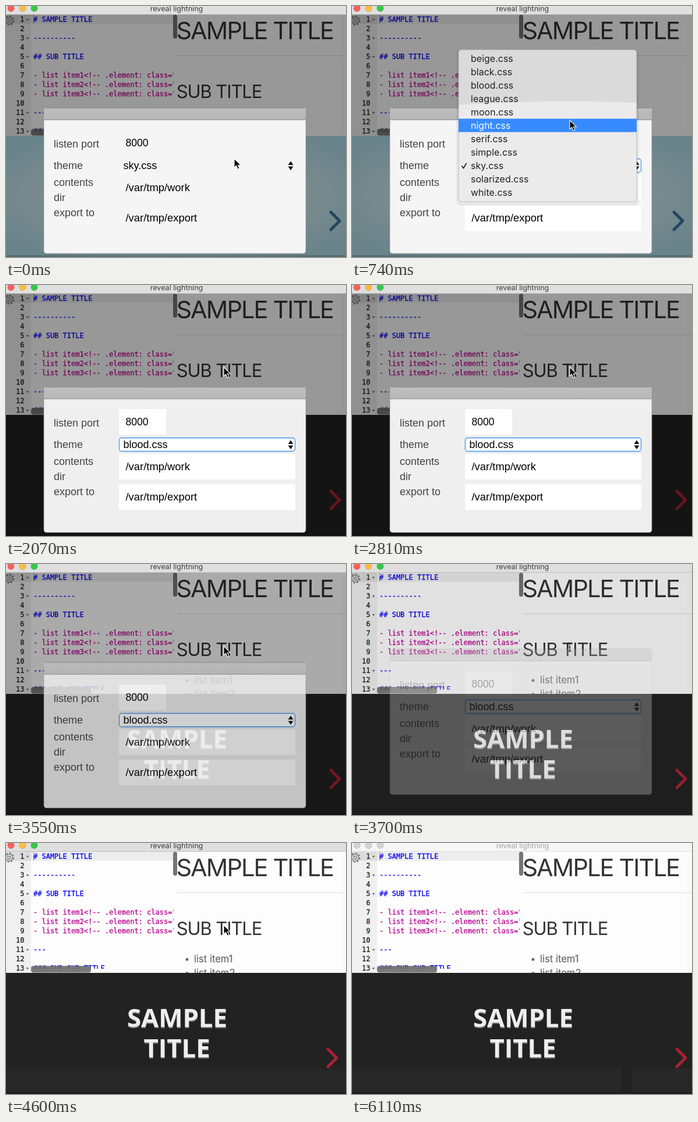
Write an HTML page that moves like this. It is 584 by 431 pixels and loops after 6.21 s.

```html
<!DOCTYPE html>
<html lang="en">
<head>
<meta charset="utf-8">
<title>reveal lightning</title>
<style>
html, body { margin: 0; width: 100%; height: 100%; overflow: hidden; background: #fff; }
svg { display: block; width: 584px; height: 431px; }
text { white-space: pre; }
.ui { font-family: Inter, Roboto, sans-serif; }
.form { font: 18px "Liberation Sans", Arial, sans-serif; }
.code { font: 12px "DejaVu Sans Mono", monospace; }
.code text { stroke-width: .3px; }
.slide { font: bold 43.7px "Open Sans", "Noto Sans", sans-serif; text-anchor: middle; }
</style>
</head>
<body>
<svg viewBox="0 0 584 431">
  <defs>
    <radialGradient id="skyFill" cx="50%" cy="50%" r="70%">
      <stop offset="0" stop-color="#f7fbfc"/><stop offset=".9" stop-color="#add9e4"/>
    </radialGradient>
    <linearGradient id="head" x2="0" y2="1">
      <stop offset="0" stop-color="#bebebe"/><stop offset="1" stop-color="#b7b7b7"/>
    </linearGradient>
    <clipPath id="paneClip"><rect y="14" width="288" height="209"/></clipPath>
    <clipPath id="textClip"><rect x="43" y="14" width="245" height="202"/></clipPath>
    <clipPath id="viewClip"><rect x="288" y="14" width="296" height="209"/></clipPath>
    <clipPath id="menuClip"><rect x="183" y="75" width="306" height="261" rx="5"/></clipPath>
  </defs>

  <rect width="584" height="431" fill="#fdfdfd"/>

  <g class="code" clip-path="url(#paneClip)">
    <rect y="14" width="43" height="209" fill="#f0f0f0"/>
    <rect y="14" width="43" height="16.5" fill="#dcdcdc"/>
    <rect x="43" y="14" width="245" height="16.5" fill="#ededed"/>
    <path d="M47.5 15V30" stroke="#888"/>
    <g fill="none" stroke="#777">
      <circle cx="5.5" cy="25" r="7.6" stroke-width="2" stroke-dasharray="3 2.97"/>
      <circle cx="5.5" cy="25" r="6" stroke-width="1.2"/>
      <circle cx="5.5" cy="25" r="2.6" stroke-width="1.1"/>
    </g>
    <g id="gutter"></g>
    <g id="editor" clip-path="url(#textClip)"></g>
  </g>
  <rect x="43" y="211" width="103" height="11.5" rx="4" fill="#6f6f6f" fill-opacity=".92"/>

  <g clip-path="url(#viewClip)" class="ui" fill="#333">
    <rect x="575" y="14" width="9" height="209" fill="#fafafa"/>
    <text x="292.4" y="56.6" font-size="41.5" letter-spacing="-1.9">SAMPLE TITLE</text>
    <path d="M294 85.5H584" stroke="#ddd"/>
    <text x="292.7" y="158" font-size="31" letter-spacing="-1.1">SUB TITLE</text>
    <g fill="#666" font-size="16.6" stroke="#666" stroke-width=".2">
      <circle cx="311" cy="200" r="2.4"/><text x="323" y="205">list item1</text>
      <circle cx="311" cy="224" r="2.4"/><text x="323" y="229">list item2</text>
    </g>
  </g>
  <rect x="287" y="15" width="7" height="41" rx="3.5" fill="#757575"/>

  <rect id="stage" y="223" width="584" height="208"/>
  <g id="blood">
    <g id="strip" fill="#272727">
      <rect y="387" width="463" height="41"/>
      <rect id="gap" x="463" y="387" width="18" height="41"/>
      <rect x="481" y="387" width="103" height="41"/>
    </g>
    <g class="slide">
      <g fill="#777"><text x="294.5" y="317.5">SAMPLE</text><text x="294" y="369.5">TITLE</text></g>
      <g fill="#eee"><text x="294" y="315.5">SAMPLE</text><text x="293.5" y="367.5">TITLE</text></g>
    </g>
  </g>
  <rect y="428" width="584" height="3" fill="#000" fill-opacity=".16"/>
  <path id="next" d="M558 354L573 369L558 384" fill="none" stroke-width="5" stroke-linecap="round" stroke-linejoin="round"/>

  <rect id="shade" y="14" width="584" height="417"/>

  <g class="ui">
    <rect id="barFill" width="584" height="15"/>
    <path id="barLine" d="M0 14.5H584"/>
    <g id="lights" stroke-opacity=".12" stroke="#000"></g>
    <text id="barText" x="293" y="9" font-size="12.6" text-anchor="middle">reveal lightning</text>
  </g>

  <g id="modal" class="form">
    <rect id="body" x="65" y="175" width="450" height="250" rx="4.5" stroke="#8a8a8a" stroke-width=".6"/>
    <path d="M65 195.5V179.5Q65 175 69.5 175H510.5Q515 175 515 179.5V195.5Z" fill="url(#head)"/>
    <path d="M65 195.5H515M69 175.3H511" stroke="#8c8c8c"/>
    <g id="boxes" fill="#fff">
      <rect x="194" y="213" width="81" height="44" rx="2"/>
      <rect x="194" y="290" width="303" height="44" rx="2"/>
    </g>
    <rect id="exportBox" x="194" y="342" width="303" height="44" rx="2" fill="#fff"/>
    <rect id="select" x="194.5" y="262.5" width="302" height="23" rx="4" fill="#fff" stroke="#3f97ee" stroke-width="1.3"/>
    <path d="M484.5 273L489 266.5L493.5 273ZM484.5 275.5L489 282L493.5 275.5Z" fill="#111"/>
    <g fill="#444">
      <text x="82" y="243">listen port</text>
      <text x="82" y="280">theme</text>
      <text x="82" y="309">contents</text>
      <text x="82" y="335">dir</text>
      <text x="82" y="361">export to</text>
    </g>
    <g fill="#000">
      <text id="theme" x="201.5" y="280"></text>
      <text x="205.5" y="241" font-size="17.6">8000</text>
      <g font-size="18.4">
        <text x="205.5" y="318">/var/tmp/work</text>
        <text x="205.5" y="370">/var/tmp/export</text>
      </g>
    </g>
  </g>

  <g id="menu" class="ui" font-size="16">
    <g id="menuFill">
      <rect x="179" y="75" width="314" height="268" rx="8" fill="#000" fill-opacity=".06"/>
      <g clip-path="url(#menuClip)">
        <rect x="183" y="75" width="306" height="261" fill="#dadada"/>
        <path d="M183 170Q330 160 489 166V336H183Z" fill="#ebebeb"/>
      </g>
      <rect x="183" y="75" width="306" height="261" rx="5" fill="none" stroke="#999" stroke-opacity=".6"/>
    </g>
    <rect id="pick" x="183" width="306" height="23" fill="#388bff"/>
    <path d="M188.5 274.5L191.5 278.5L196.5 270" fill="none" stroke="#222" stroke-width="1.8"/>
  </g>

  <path id="arrow" d="M0 0V15.5L3.6 12.2L6.2 18.2L9 17L6.4 11.2H11.3Z" fill="#000" stroke="#fff" stroke-width="1.1"/>
  <path id="beam" d="M-3 -6Q0 -6 0 -4Q0 -6 3 -6M0 -4V7M-3 9Q0 9 0 7Q0 9 3 9M-1.5 2H1.5" fill="none" stroke="#222" stroke-width="1.2"/>
</svg>
<script>
const LOOP = 6210;
const $ = id => document.getElementById(id);

function add(parent, tag, attrs, text) {
  const el = document.createElementNS("http://www.w3.org/2000/svg", tag);
  for (const k in attrs) el.setAttribute(k, attrs[k]);
  if (text) el.textContent = text;
  parent.appendChild(el);
  return el;
}
const set = (id, attrs) => {
  for (const k in attrs) $(id).setAttribute(k, attrs[k]);
};
const show = (id, on) => set(id, { visibility: on ? "visible" : "hidden" });

// Markdown pane
const item = n => "- list item" + n + "<" + '!-- .element: class="fragment" -->';
const lines = ["# SAMPLE TITLE", "", "----------", "", "## SUB TITLE", "",
  item(1), item(2), item(3), "", "---", "", "### SUB SUB TITLE"];
lines.forEach((line, i) => {
  const y = 27 + i * 16;
  add($("gutter"), "text", { x: 31.5, y, "text-anchor": "end", fill: "#222", stroke: "#222" }, String(i + 1));
  if (!line) return;
  const list = line.startsWith("- ");
  const color = list ? "#b90690" : "#0c07f0";
  add($("editor"), "text", { x: 47, y, fill: color, stroke: color }, line);
  if (!list) add($("gutter"), "path", { d: `M34.5 ${y - 5}h5l-2.5 3.5z`, fill: "#777" });
});

const lights = ["#fc605b", "#fdbc40", "#34c84a"].map((color, i) =>
  [add($("lights"), "circle", { cx: 8.5 + i * 20, cy: 4, r: 5.8 }), color]);

const names = ["beige", "black", "blood", "league", "moon", "night",
  "serif", "simple", "sky", "solarized", "white"];
const options = names.map((name, i) =>
  add($("menu"), "text", { x: 204, y: 96 + i * 23 }, name + ".css"));

// Each row: start time, then the values held until the next row
const pointer = [[0, 392, 262], [150, 392, 264], [450, 388, 252], [600, 381, 228], [740, 374, 196],
  [890, 374, 164], [1030, 374, 141], [5200, 386, 166], [5350, 411, 232], [5500, 440, 312],
  [5660, 464, 386], [5810, 472, 440]];
const fade = [[0, 0, 1, .4], [3550, -6, .8, .33], [3700, -29, .27, .11], [3850, -40, 0, .02], [4000, -40, 0, 0]];
const bounce = [[-300, 3], [-150, 6], [0, -5], [150, 0]];
const peaks = [740, 2660, 4600];

function at(rows, t) {
  let hit = null;
  for (const row of rows) if (t >= row[0]) hit = row;
  return hit;
}

function nudge(t) {
  const peak = peaks.find(p => t >= p - 300 && t < p + 300);
  return peak ? at(bounce, t - peak)[1] : 0;
}

function draw(t) {
  const dark = t >= 2070, active = t < 5960;
  const open = t >= 150 && t < 1770, fading = open && t >= 1620;

  set("stage", { fill: dark ? "#222" : "url(#skyFill)" });
  show("blood", dark);
  set("strip", { opacity: t >= 4000 ? 1 : 0 });
  set("gap", { opacity: t >= 5660 ? 0 : 1 });
  set("next", { stroke: dark ? "#a23" : "#3b759e", transform: `translate(${nudge(t)} 0)` });

  set("barFill", { fill: active ? "#dfdfdf" : "#f6f6f6" });
  set("barLine", { stroke: active ? "#bdbdbd" : "#dedede" });
  set("barText", { fill: active ? "#3c3c3c" : "#a5a5a5" });
  for (const [dot, color] of lights) dot.setAttribute("fill", active ? color : "#d4d4d4");

  const [, shift, alpha, shade] = at(fade, t);
  set("shade", { "fill-opacity": shade });
  set("modal", { transform: `translate(0 ${shift})`, opacity: alpha });
  set("body", { fill: t < 1770 ? "#f5f5f5" : "#efefef" });
  set("boxes", { opacity: t < 150 || fading ? 0 : 1 });
  set("exportBox", { opacity: t < 150 ? 0 : 1 });
  set("select", { opacity: t < 150 ? 0 : 1 });
  $("theme").textContent = t < 1770 ? "sky.css" : "blood.css";

  const [, x, y] = at(pointer, t);
  const row = Math.floor((y - 78.5) / 23);
  show("menu", open);
  set("menu", { opacity: fading ? .28 : 1 });
  set("menuFill", { opacity: fading ? .4 : 1 });
  set("pick", { y: 78.5 + row * 23 });
  options.forEach((el, i) => el.setAttribute("fill", open && i === row ? "#fff" : "#222"));

  const beam = t >= 3700 && t < 4000;
  show("beam", beam);
  show("arrow", !beam && active);
  set("arrow", { transform: `translate(${x} ${y})` });
  set("beam", { transform: `translate(${x} ${y})` });
}

let start = null;
function tick(now) {
  if (start === null) start = now;
  draw((now - start) % LOOP);
  requestAnimationFrame(tick);
}
draw(0);
requestAnimationFrame(tick);
</script>
</body>
</html>
```
